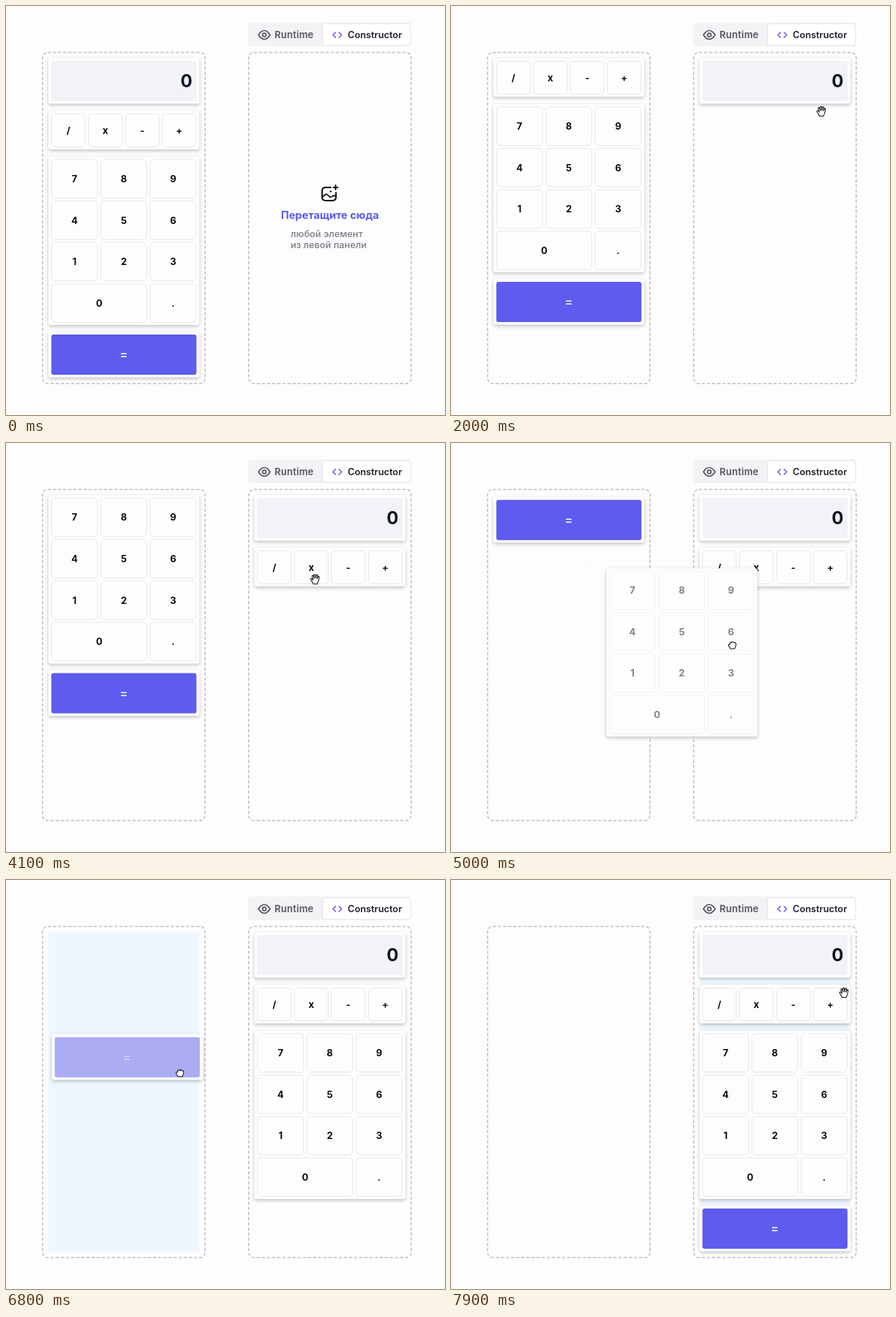
Write an HTML page with a canvas that moves like this. It is 600 by 559 pixels and loops after 8000 ms.

```html
<!DOCTYPE html>
<html lang="ru">
<head>
<meta charset="utf-8">
<title>Calculator constructor</title>
<style>
html, body { margin: 0; width: 100%; height: 100%; overflow: hidden; background: #fefdfe; }
canvas { display: block; width: 600px; height: 559px; }
</style>
</head>
<body>
<canvas id="stage"></canvas>
<script>
const W = 600, H = 559, LOOP = 8000;
const canvas = document.getElementById('stage');
const ctx = canvas.getContext('2d');
const dpr = window.devicePixelRatio || 1;
canvas.width = W * dpr;
canvas.height = H * dpr;

const FONT = 'Montserrat, Inter, "Open Sans", sans-serif';
const PAPER = '#fefdfe', LINE = '#e5e5ec', INK = '#0b0b12', BLUE = '#5d5cee';
const LEFT = 58, RIGHT = 339.6, CARD_W = 206.3;

const clamp = v => Math.max(0, Math.min(1, v));
const span = (t, a, b) => clamp((t - a) / (b - a));
const easeOut = p => 1 - Math.pow(1 - p, 3);

function box(x, y, w, h, r, fill, stroke, width = 1) {
  ctx.beginPath();
  ctx.roundRect(x, y, w, h, r);
  if (fill) { ctx.fillStyle = fill; ctx.fill(); }
  if (stroke) { ctx.strokeStyle = stroke; ctx.lineWidth = width; ctx.stroke(); }
}

function text(s, x, y, size, weight, color, align = 'center', spacing = 0) {
  ctx.font = `${weight} ${size}px ${FONT}`;
  ctx.letterSpacing = spacing + 'px';
  ctx.textAlign = align;
  ctx.fillStyle = color;
  ctx.fillText(s, x, y);
}

function key(label, x, y, w, h) {
  box(x + .5, y + .5, w - 1, h - 1, 5, PAPER, LINE);
  text(label, x + w / 2, y + h / 2 + 4.7, 13, 700, INK);
}

// Card contents are drawn relative to the card's top left corner.
const items = [
  { y: 71, h: 62.5, draw() {
    box(4, 4, 198.3, 55, 3, '#f1f3f6');
    text('0', 196.8, 40.3, 24, 700, '#0f1424', 'right');
  } },
  { y: 143, h: 53, draw() {
    ['/', 'x', '-', '+'].forEach((s, i) => key(s, 3.7 + i * 50.5, 4, 47, 46));
  } },
  { y: 206, h: 230, draw() {
    [...'789456123'].forEach((s, i) =>
      key(s, 3.7 + i % 3 * 67.4, 3.5 + Math.floor(i / 3) * 56.6, 63.8, 53.5));
    key('0', 3.7, 173.3, 131.2, 53.5);
    key('.', 138.5, 173.3, 63.8, 53.5);
  } },
  { y: 445, h: 62.5, draw() {
    box(4, 4, 198.3, 55, 3, BLUE);
    text('=', 103, 37.3, 16.5, 500, '#fff');
  } }
];

// One drag per card; dx, dy is the grip inside the dragged card.
const drags = [
  { press: 1220, pick: 1350, drop: 1950, dx: 180, dy: 63, shift: 72, fold: 1580, glow: [1350, 1500, 1750] },
  { press: 2870, pick: 2950, drop: 3750, dx: 199, dy: 66, shift: 62.6, fold: 3215, glow: [2950, 3080, 3320] },
  { press: 4600, pick: 4720, drop: 5550, dx: 172, dy: 105, shift: 239.4, fold: 4830, glow: [4720, 4800, 5010] },
  { press: 6380, pick: 6550, drop: 7350, dx: 175, dy: 53, shift: 0, fold: LOOP, glow: [6550, 7150, 7190] }
];

const path = [
  [100, 500, 44], [850, 190, 112], [1200, 185, 115], [1340, 185, 115],
  [1800, 494, 142], [1950, 506, 144], [2050, 506, 144], [2700, 172, 110],
  [2850, 208, 119], [2930, 209, 119], [3200, 356, 168], [3600, 506, 196],
  [3800, 511, 199], [3900, 511, 199], [4500, 172, 150], [4650, 182, 158],
  [4720, 183, 160], [5000, 384, 276], [5400, 503, 314], [5550, 510, 316],
  [5650, 510, 316], [6300, 173, 103], [6390, 178, 104], [6550, 180, 106],
  [7100, 387, 483], [7200, 488, 490], [7330, 512, 492], [7430, 512, 490],
  [7860, 537, 154], [8000, 537, 154]
];

// Monotone cubic through the path points.
function slope(i, k) {
  if (i < 1 || i >= path.length - 1) return 0;
  const rate = j => (path[j + 1][k] - path[j][k]) / (path[j + 1][0] - path[j][0]);
  const a = rate(i - 1), b = rate(i);
  return a * b <= 0 ? 0 : 2 * a * b / (a + b);
}

function cursorAt(t) {
  let i = 0;
  while (i < path.length - 2 && path[i + 1][0] <= t) i++;
  const a = path[i], b = path[i + 1], d = b[0] - a[0], u = clamp((t - a[0]) / d);
  return [1, 2].map(k =>
    a[k] * (1 + 2 * u) * (1 - u) ** 2 + b[k] * u * u * (3 - 2 * u) +
    d * (slope(i, k) * u * (1 - u) ** 2 - slope(i + 1, k) * u * u * (1 - u)));
}

function card(item, x, y, alpha = 1) {
  ctx.save();
  ctx.translate(x, y);
  ctx.shadowColor = 'rgba(0,0,0,.24)';
  ctx.shadowBlur = 5 * dpr;
  ctx.shadowOffsetY = 2 * dpr;
  box(0, 0, CARD_W, item.h, 3, PAPER);
  ctx.shadowColor = 'transparent';
  ctx.globalAlpha = alpha;
  item.draw();
  ctx.restore();
}

function glow(x, alpha) {
  if (alpha <= 0) return;
  ctx.globalAlpha = alpha;
  box(x, 71.5, CARD_W, 436.5, 3, '#eef7fe');
  ctx.globalAlpha = 1;
}

function panel(x) {
  ctx.setLineDash([4.4, 2.6]);
  box(x, 63.5, 222, 452.5, 7, null, '#bdbdc3', 1.5);
  ctx.setLineDash([]);
}

function strokePath(d, color, width, fill) {
  const p = new Path2D(d);
  ctx.lineCap = ctx.lineJoin = 'round';
  if (fill) { ctx.fillStyle = fill; ctx.fill(p); }
  ctx.strokeStyle = color;
  ctx.lineWidth = width;
  ctx.stroke(p);
  ctx.lineCap = 'butt';
  ctx.lineJoin = 'miter';
}

function tabs() {
  box(331, 22.5, 222.5, 32.5, 4, '#f3f3f5');
  box(432.5, 24, 120.5, 30, 4, '#fff', '#e2e2e8');
  strokePath('M345 39.5Q353 27.5 361 39.5Q353 51.5 345 39.5Z', '#52555e', 1.7);
  strokePath('M355.4 39.5a2.4 2.4 0 1 1-4.8 0a2.4 2.4 0 1 1 4.8 0Z', '#52555e', 1.7);
  strokePath('M450.3 36L446.8 39.5L450.3 43M455.2 36L458.7 39.5L455.2 43', BLUE, 1.6);
  text('Runtime', 367, 43.5, 13, 600, '#52555e', 'left', .25);
  text('Constructor', 467, 43.5, 12.8, 600, '#20222c', 'left');
}

function placeholder() {
  strokePath('M444 248H437Q432 248 432 253V261Q432 266 437 266H446Q451 266 451 261V255', INK, 1.9);
  strokePath('M432.5 261L436 258Q438 256.5 440 258.5L442 260.5Q444 262 446 260L447 259.4Q449 258.5 451 261', INK, 1.7);
  strokePath('M450.5 245V251M447.5 248H453.5', INK, 1.9);
  box(442.6, 252.2, 2.4, 2.4, 1.2, INK);
  text('Перетащите сюда', 442.7, 290.5, 14.6, 700, BLUE);
  text('любой элемент', 389, 315.6, 12.8, 500, '#777b86', 'left');
  text('из левой панели', 389, 331.2, 12.8, 500, '#777b86', 'left');
}

const HAND = 'M-2.4 6.5C-3 4.5-5 2.8-5.8.4C-6.2-1-4.6-1.4-3.8-.2L-2.7 1.2L-4-4C-4.3-5.5-2.6-5.8-2.2-4.4' +
  'L-1.2-1L-1.4-5.6C-1.4-7 .5-7 .6-5.6L.9-1.1L1.9-5.3C2.3-6.6 4-6.2 3.7-4.8L3-.7L4.2-3.2C4.8-4.4 6.3-3.8 5.8-2.4' +
  'C5.2-.4 5 1.6 4.4 3.2C3.8 4.6 3.4 5.2 3.2 6.5Z';
const FIST = 'M-2.6 5C-2.8 3.6-5 2-5.1.2C-5.2-1.2-3.8-1.6-3-.8L-3.3-2.4C-3.3-3.8-1.8-4.2-1.1-3.3' +
  'C-.7-4.8 1-4.8 1.4-3.4C2.1-4.3 3.4-4 3.6-2.7C4.5-3.1 5.4-2.4 5.2-1.1C5.1 1 4.8 2 3.8 3.4L3.4 5Z';

function hand(x, y, closed, tint) {
  ctx.save();
  ctx.translate(x, y);
  strokePath(closed ? FIST : HAND, '#111', 1.05, tint ? '#f04a5e' : '#fff');
  ctx.restore();
}

function pulse(t, d) {
  const age = t - d.press;
  if (age < 0 || age > 420) return;
  const p = age / 420, [x, y] = cursorAt(d.press);
  const r = 3 + 15.5 * easeOut(p);
  ctx.globalAlpha = Math.pow(1 - p, 1.1);
  ctx.beginPath();
  ctx.arc(x - 6 * clamp(age / 60), y, r, 0, 7);
  ctx.fillStyle = `rgba(255,70,100,${.3 * (1 - p)})`;
  ctx.fill();
  ctx.strokeStyle = p < .4 ? '#f5405e' : '#f08a7c';
  ctx.lineWidth = 3;
  ctx.stroke();
  ctx.globalAlpha = 1;
}

function draw(t) {
  ctx.setTransform(dpr, 0, 0, dpr, 0, 0);
  ctx.fillStyle = PAPER;
  ctx.fillRect(0, 0, W, H);
  tabs();
  panel(50);
  panel(331.7);

  for (const { glow: [a, b, c] } of drags)
    glow(LEFT, span(t, a, a + 80) * (1 - span(t, b, c)));
  glow(RIGHT, span(t, 7350, 7450));
  if (t < drags[0].drop) placeholder();

  const cur = cursorAt(t);
  let up = 0, held = null;
  items.forEach((item, i) => {
    const d = drags[i];
    if (t < d.pick) card(item, LEFT, item.y - up);
    else if (t >= d.drop) card(item, RIGHT, item.y);
    else held = { item, d, y: item.y - up };
    up += d.shift * easeOut(span(t, d.fold, d.fold + 220));
  });

  if (held) {
    const { item, d, y } = held, p = span(t, d.pick, d.pick + 160);
    const x0 = LEFT + (cur[0] - d.dx - LEFT) * p;
    card(item, x0, y + (cur[1] - d.dy - y) * p, .5);
  }
  drags.forEach(d => pulse(t, d));
  if (t >= 100) {
    const fresh = drags.some(d => t >= d.press && t < d.press + 50);
    hand(cur[0], cur[1], !!held, fresh);
  }
}

function frame(now) {
  draw(now % LOOP);
  requestAnimationFrame(frame);
}
draw(0);
requestAnimationFrame(frame);
</script>
</body>
</html>
```
